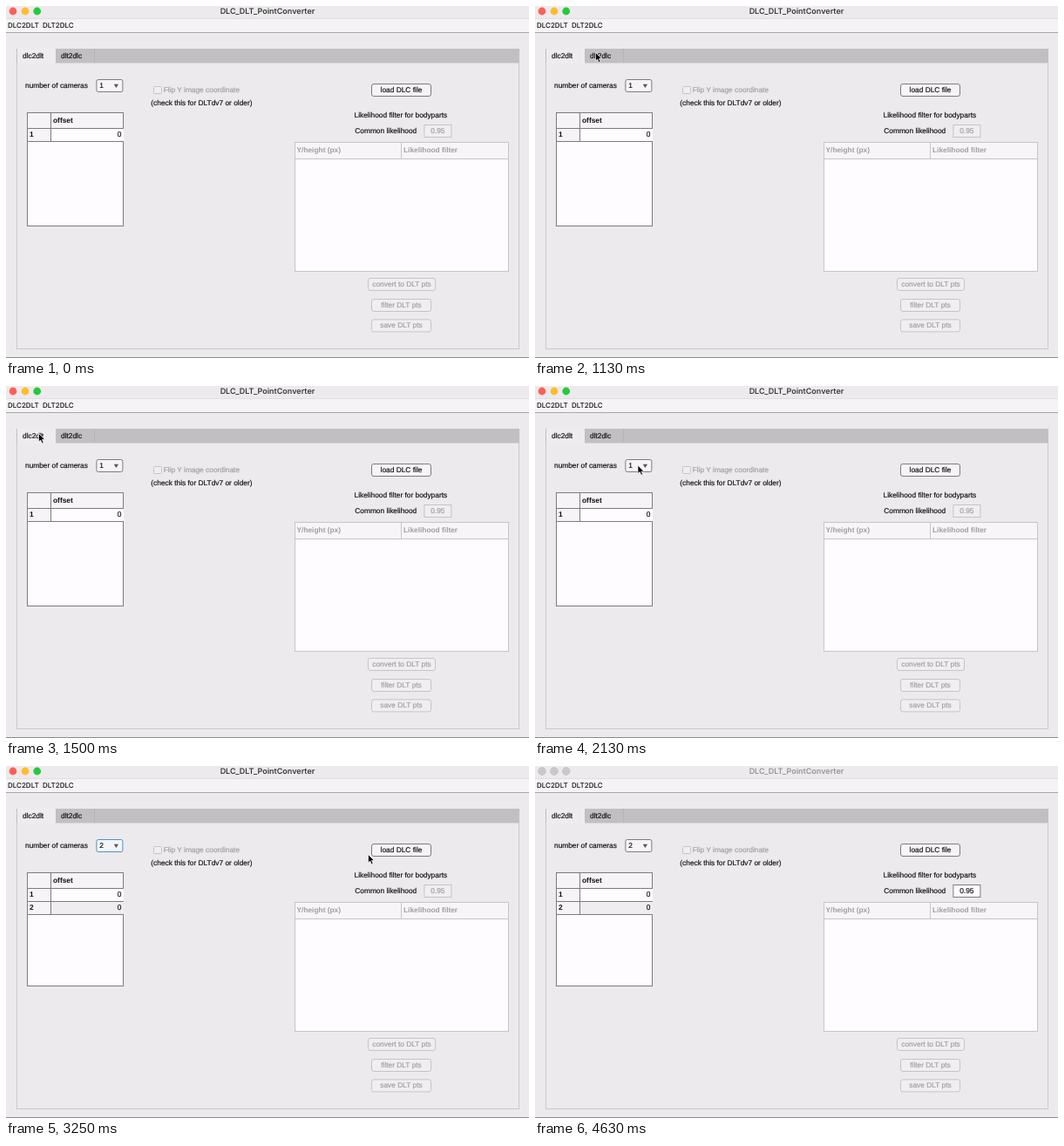
Recreate the animation shown at these times as an HTML page. Size 600 by 404 pixels, loop 5010 ms.

```html
<!DOCTYPE html>
<html lang="en">
<head>
<meta charset="utf-8">
<title>Point converter</title>
<style>
html, body { margin: 0; height: 100%; overflow: hidden; background: #eceaec; }
svg { display: block; width: 600px; height: 404px; }
text {
  font: 8.35px "Liberation Sans", Arial, sans-serif; text-rendering: geometricPrecision;
  fill: #111; stroke: #111; stroke-width: .18px; white-space: pre;
}
.bold { font-weight: bold; stroke: none; }
.off { fill: #a09ea0; stroke: #a09ea0; }
.bold.off { stroke: none; }
.end { text-anchor: end; }
.mid { text-anchor: middle; }
.menu { font: 500 8px Inter, sans-serif; stroke: none; }
#title { font: 600 9px Inter, sans-serif; fill: #3a393a; }
.idle #title { fill: #979596; }
.idle .light { fill: #cac8ca; stroke: #bbb9bb; stroke-width: .6px; }
.focus { stroke: #4495cc; }
</style>
</head>
<body>
<svg id="stage" viewBox="0 0 600 404"></svg>
<script>
const LOOP = 5010, STEP = 125;
const DARK = '#7d7b7d', PALE = '#c6c4c6', FACE = '#f6f4f6', DIM = '#f0eef0', HEAD = '#f7f5f7', PAPER = '#fefcfe';

const text = (x, y, s, cls = '', id = '') => `<text x="${x}" y="${y - .3}" class="${cls}" id="${id}">${s}</text>`;
const fill = (x, y, w, h, color) => `<rect x="${x}" y="${y}" width="${w}" height="${h}" fill="${color}"/>`;
const box = (x, y, w, h, color, line, r = 0, id = '') =>
  `<rect x="${x + .5}" y="${y + .5}" width="${w}" height="${h}" rx="${r}" fill="${color}" stroke="${line}" id="${id}"/>`;
const line = (d, color) => `<path d="${d}" stroke="${color}" fill="none"/>`;

const button = (x, y, w, label, on, id) =>
  box(x, y, w, 14, on ? FACE : DIM, on ? DARK : PALE, 2.5, id) +
  text(x + w / 2 + .5, y + 10.3, label, on ? 'mid' : 'mid off');

const dropdown = (x, y, id) =>
  box(x, y, 30, 14, FACE, DARK, 2, id) + text(x + 3.8, y + 10.3, '1', '', id + 'Value') +
  `<path d="M${x + 20.4} ${y + 5.8}h5.2l-2.6 4.2z" fill="#555"/>`;

const checkbox = (x, y) =>
  box(x, y, 9, 8, DIM, PALE, 1) + text(x + 11.7, y + 7.6, 'Flip Y image coordinate', 'off') +
  text(x - 2.7, y + 22, '(check this for DLTdv7 or older)');

const tableRow = (y, n, color) =>
  fill(25, y, 27, 15, FACE) + fill(52, y, 83, 15, color) +
  line(`M24 ${y + 14.5}H135M51.5 ${y}v15`, DARK) +
  text(27, y + 9.7, n, 'bold') + text(132.4, y + 9.5, '0', 'end');

const windowFrame =
  fill(0, 0, 600, 404, '#eceaec') +
  fill(0, 15, 600, 15, '#f5f3f5') +
  line('M0 14.5H600', '#e0dee0') + line('M0 30.5H600', '#a8a6a8') + line('M0 403.5H600', '#8b898b') +
  [['#fe5f57', 8], ['#febc2e', 22], ['#28c840', 35.7]].map(([c, x]) =>
    `<circle class="light" cx="${x}" cy="6" r="4.4" fill="${c}"/>`).join('') +
  text(300, 9.4, 'DLC_DLT_PointConverter', 'bold mid', 'title') +
  text(2, 25.4, 'DLC2DLT', 'menu') + text(42, 25.4, 'DLT2DLC', 'menu') +
  box(12, 49, 576, 344, '#eceaec', '#cbc9cb') +
  fill(12, 49, 577, 16.5, '#c1bfc1') + line('M101.5 49V65', '#b6b4b6') +
  `<rect id="tab" y="49" width="44" height="17" fill="#eeecee"/>` +
  text(19, 60, 'dlc2dlt') + text(63, 60, 'dlt2dlc');

const pageA =
  text(22, 94.2, 'number of cameras') + dropdown(103.4, 84, 'cameras') +
  box(24, 122, 110, 130, PAPER, DARK) + fill(25, 123, 109, 18, FACE) +
  line('M24 140.5H135M51.5 122V141', DARK) + text(54, 134, 'offset', 'bold') +
  tableRow(141, 1, PAPER) + `<g id="row2">${tableRow(156, 2, '#efedef')}</g>` +
  checkbox(169, 92) +
  button(419, 89, 68, 'load DLC file', true, 'load') +
  text(399.5, 128, 'Likelihood filter for bodyparts') + text(400.3, 146.5, 'Common likelihood') +
  box(479.4, 136, 31, 14, DIM, PALE, 0, 'likely') + text(495.3, 146.5, '0.95', 'mid', 'likelyValue') +
  box(331, 156, 245, 148, PAPER, PALE) + fill(332, 157, 244, 18, HEAD) +
  line('M331 175.5H577M453.5 156V175', PALE) +
  text(333.5, 168.5, 'Y/height (px)', 'bold off') + text(456, 168.5, 'Likelihood filter', 'bold off') +
  button(415, 312, 77, 'convert to DLT pts') +
  button(419, 336, 68, 'filter DLT pts') + button(419, 359.4, 68, 'save DLT pts');

const pageB =
  text(25, 89.5, 'number of cameras') + dropdown(106.4, 79, 'other') +
  text(28.5, 114.5, 'number of points') + box(106, 104, 26, 14, PAPER, DARK) + text(129.5, 114.5, '1', 'end') +
  button(53, 127, 68, 'load DLT file', true) + checkbox(175, 86) +
  text(406, 88.3, 'Scorer') + box(440, 78, 68, 14, DIM, PALE) + text(443.5, 88.5, 'enter_name', 'off') +
  box(400, 104, 124, 114, PAPER, PALE) + fill(401, 105, 123, 18, HEAD) + line('M400 122.5H525', PALE) +
  text(402.5, 116.3, 'label_point', 'bold off') +
  box(353, 226, 217, 133, 'none', DARK) + line('M353 238.5H571', DARK) + text(355.5, 235.3, 'DLT video') +
  button(474, 257, 68, 'load DLT video') + button(474, 287, 68, 'extract frames') +
  button(474, 315.4, 68, 'check labels') + button(427, 366, 68, 'make DLC files');

const popup = box(103, 99, 30, 149, PAPER, '#a9a7a9') +
  `<rect id="hover" x="104" width="29" height="15" fill="#cfe3f2"/>` +
  Array.from({ length: 10 }, (_, i) => text(106.5, 110 + i * 14.9, i + 1)).join('');

const $ = id => document.getElementById(id);
$('stage').innerHTML = windowFrame +
  `<g id="pageA">${pageA}</g><g id="pageB">${pageB}</g><g id="popup">${popup}</g>
  <path id="cursor" d="M0 0V9.6L2.2 7.6 3.8 11.2 5.6 10.4 4 7H7Z" fill="#000" stroke="#fff" stroke-width=".7"/>`;

// Pointer path: step, x, y
const path = [
  [1, 122, 144], [4, 106, 92], [6, 88, 66], [9, 69.5, 53.5], [10, 65, 54.5], [12, 37.5, 54.5],
  [13, 38, 56], [15, 72, 76], [17, 118, 91], [18, 120, 94], [20, 118, 119], [21, 116.5, 122.5],
  [23, 190, 121], [25, 381, 106], [27, 450, 97], [28, 462, 97], [30, 479, 120.5], [34, 475, 118], [36, 475, 118]
];

function pointer(k) {
  const i = Math.max(1, path.findIndex(p => p[0] >= k));
  const [a, x, y] = path[i - 1], [b, u, v] = path[i];
  const f = (k - a) / (b - a);
  return [x + (u - x) * f, y + (v - y) * f];
}

const show = (id, on) => $(id).style.display = on ? '' : 'none';

function draw(t) {
  let k = Math.floor(t / STEP);
  if (t < Math.round(k * STEP / 10) * 10) k--;   // steps begin on whole centiseconds
  const second = k >= 10 && k < 12, two = k >= 21, idle = k >= 36, enabled = k >= 30;
  const open = k >= 18 && k < 21;

  $('stage').classList.toggle('idle', idle);
  $('tab').setAttribute('x', second ? 57 : 13);
  show('pageA', !second);
  show('pageB', second);
  show('popup', open);
  show('row2', two);
  $('hover').setAttribute('y', k < 20 ? 100 : 114.5);
  $('camerasValue').textContent = two ? 2 : 1;
  $('cameras').classList.toggle('focus', k >= 18 && k < 28);
  $('load').classList.toggle('focus', k >= 28 && !idle);
  $('likely').setAttribute('fill', enabled ? PAPER : DIM);
  $('likely').setAttribute('stroke', enabled ? DARK : PALE);
  $('likelyValue').classList.toggle('off', !enabled);

  const moving = k >= 1 && !idle;
  show('cursor', moving);
  if (moving) $('cursor').setAttribute('transform', `translate(${pointer(k)})`);
}

const start = performance.now();
function tick() {
  draw((performance.now() - start) % LOOP);
  requestAnimationFrame(tick);
}
tick();
</script>
</body>
</html>
```
